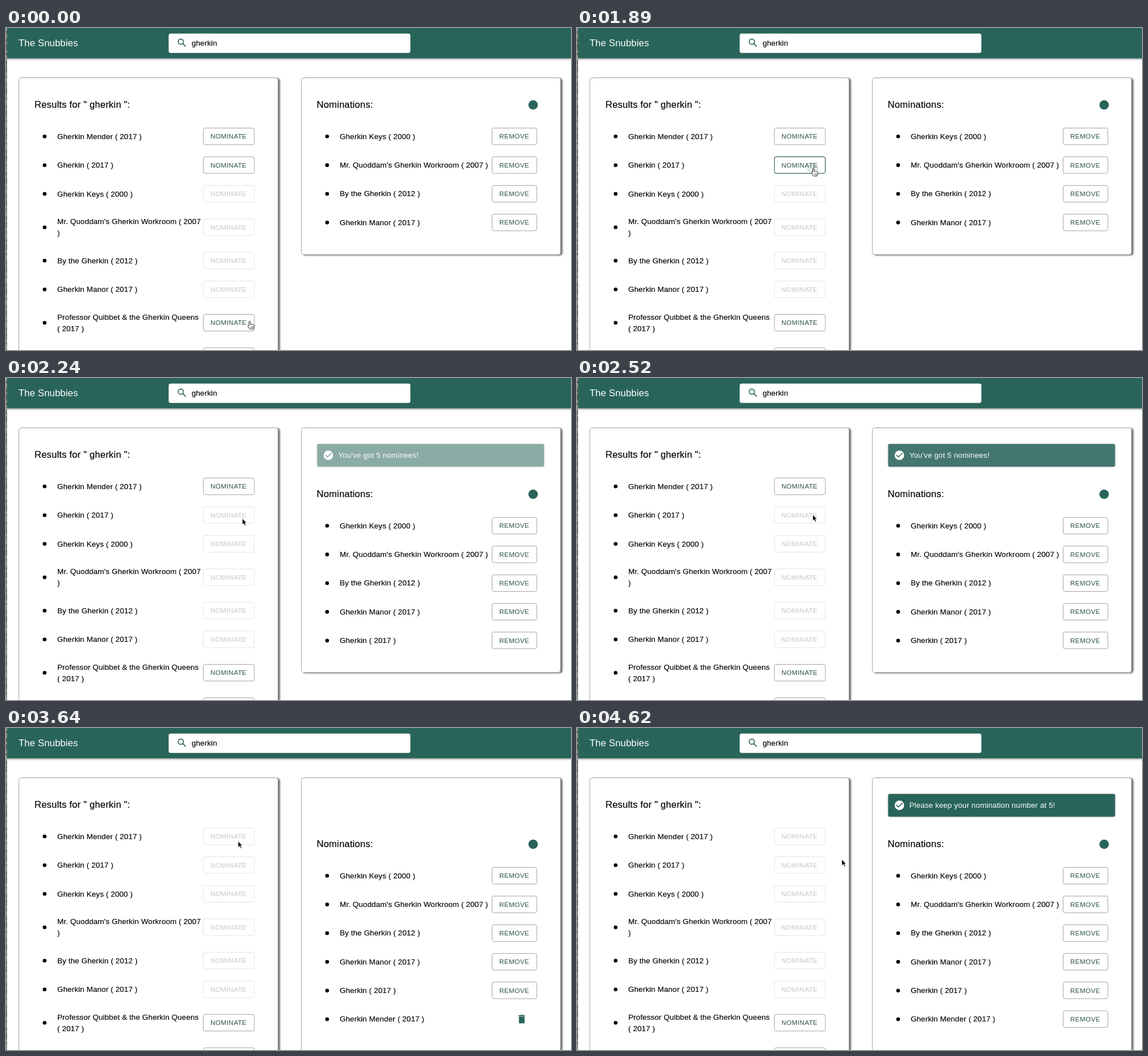
Write an HTML page that moves like this. It is 992 px wide and 565 px high and loops after 4.69 s.

```html
<!DOCTYPE html>
<html lang="en">
<head>
<meta charset="utf-8">
<title>The Snubbies</title>
<style>
  html, body { margin: 0; width: 100%; height: 100%; overflow: hidden; background: #fff; }
  svg { display: block; width: 992px; height: 565px; }
  text { font: 13.37px "Liberation Sans", Arial, Helvetica, sans-serif; letter-spacing: .0094em; fill: #000; stroke: #000; stroke-width: .15px; white-space: pre; }
  .title { font-size: 16.7px; letter-spacing: .0075em; }
  .light { fill: #fff; stroke: none; }
  .label { font-size: 11.7px; letter-spacing: .0286em; fill: #2a5349; stroke: none; }
  .green { fill: #29645a; }
  .panel { fill: #fff; stroke: #a8a8a8; filter: drop-shadow(3.5px 1.7px 1.6px rgba(0, 0, 0, .58)); }
  .box { fill: #fff; stroke: #a3a3a3; }
  .off .box { stroke: #e4e4e4; }
  .off .label { fill: #c6c6c6; }
  .box.hot { fill: none; stroke: #29645a; }

  .t { animation: 4690ms step-end infinite; }

  @keyframes before5 { 0% { opacity: 1 } 41.7%, 100% { opacity: 0 } }
  @keyframes after5 { 0% { opacity: 0 } 41.7%, 100% { opacity: 1 } }
  @keyframes before6 { 0% { opacity: 1 } 77.5%, 100% { opacity: 0 } }
  @keyframes after6 { 0% { opacity: 0 } 77.5%, 100% { opacity: 1 } }
  @keyframes trash5 { 0% { opacity: 0 } 41.7% { opacity: 1 } 44.7%, 100% { opacity: 0 } }
  @keyframes trash6 { 0% { opacity: 0 } 77.5% { opacity: 1 } 80.5%, 100% { opacity: 0 } }
  @keyframes remove5 { 0% { opacity: 0 } 44.7%, 100% { opacity: 1 } }
  @keyframes remove6 { 0% { opacity: 0 } 80.5%, 100% { opacity: 1 } }
  @keyframes press5 { 0% { opacity: 0 } 40.2% { opacity: .13 } 41.7%, 100% { opacity: 0 } }
  @keyframes press6 { 0% { opacity: 0 } 76.1% { opacity: .13 } 77.5%, 100% { opacity: 0 } }
  @keyframes grow { 0% { height: 310px } 41.7% { height: 429px } 77.5%, 100% { height: 479.5px } }
  @keyframes shift { 0% { transform: none } 41.7%, 100% { transform: translateY(69px) } }
  @keyframes hover5 {
    0% { opacity: 0 }
    11.3% { opacity: 0; animation-timing-function: ease-in-out }
    16.4%, 100% { opacity: 1 }
  }
  @keyframes hover6 {
    0% { opacity: 0 }
    56.5% { opacity: 0; animation-timing-function: ease-in-out }
    61%, 100% { opacity: 1 }
  }
  @keyframes notice {
    0% { opacity: 0 }
    41.05% { opacity: 0; animation-timing-function: ease }
    62.4% { opacity: 1 }
    77.5% { opacity: 0 }
    78.36% { opacity: 0; animation-timing-function: ease }
    99.68%, 100% { opacity: 1 }
  }
  @keyframes move {
    0% { transform: translate(428px, 515px) }
    1.49% { transform: translate(428px, 515px); animation-timing-function: ease-in-out }
    11.94% { transform: translate(415px, 246.5px) }
    52.2% { transform: translate(415px, 246.5px); animation-timing-function: ease-in-out }
    58.2% { transform: translate(407.5px, 198.5px) }
    88.1% { transform: translate(407.5px, 198.5px); animation-timing-function: ease-in-out }
    97%, 100% { transform: translate(465px, 230.5px) }
  }
  @keyframes hand {
    0% { opacity: 1 } 2.9% { opacity: 0 } 11.2% { opacity: 1 }
    41.7% { opacity: 0 } 56.5% { opacity: 1 } 77.5%, 100% { opacity: 0 }
  }
  @keyframes arrow {
    0% { opacity: 0 } 2.9% { opacity: 1 } 11.2% { opacity: 0 }
    41.7% { opacity: 1 } 56.5% { opacity: 0 } 77.5%, 100% { opacity: 1 }
  }
</style>
</head>
<body>
<script>
const films = {
  mender: 'Gherkin Mender ( 2017 )',
  plain: 'Gherkin ( 2017 )',
  keys: 'Gherkin Keys ( 2000 )',
  shop: "Mr. Quoddam's Gherkin Workroom ( 2007 )",
  by: 'By the Gherkin ( 2012 )',
  manor: 'Gherkin Manor ( 2017 )',
};

const text = (x, y, words, cls = '') => `<text x="${x}" y="${y}" class="${cls}">${words}</text>`;
const timed = (name, body) => `<g class="t" style="animation-name:${name}">${body}</g>`;
const icon = (x, y, body) => `<g transform="translate(${x} ${y}) scale(.836)">${body}</g>`;
const outline = (x, y, w, cls = '') =>
  `<rect x="${x + .5}" y="${y - 14.6}" width="${w - 1}" height="29.2" rx="3.3" class="box ${cls}"/>`;
const button = (x, y, w, label, extra = '') =>
  outline(x, y, w) + extra + text(x + 13, y + 4.2, label, 'label');
const nominate = (y, extra) => button(346, y, 90.5, 'NOMINATE', extra);
const disabled = y => `<g class="off">${nominate(y)}</g>`;

function item(x, y, ...lines) {
  const top = y + 4.7 - (lines.length - 1) * 10;
  return `<circle cx="${x + 67.8}" cy="${y + .3}" r="3.3"/>` +
    lines.map((line, i) => text(x + 90, top + i * 20, line)).join('');
}

// A button that is hovered, pressed, then disabled when its film is nominated.
function picked(y, n, px, py) {
  const hot = `<circle cx="${px}" cy="${py}" r="10" class="green t" style="animation-name:press${n}"/>` +
    timed('hover' + n, outline(346, y, 90.5, 'hot'));
  return timed('before' + n, nominate(y, hot)) + timed('after' + n, disabled(y));
}

const header = `
  <rect x="1.6" width="991" height="53.2" class="green" style="filter:drop-shadow(0 2px 1.6px rgba(0,0,0,.35))"/>
  ${text(22, 32, 'The Snubbies', 'title light')}
  <rect x="285.6" y="9.8" width="424.4" height="34" rx="3.5" fill="#fff"/>
  ${icon(299, 16, '<g fill="none" stroke="#29645a" stroke-width="2"><circle cx="9.5" cy="9.5" r="5.5"/><path d="M13.6 13.6L19.8 19.8"/></g>')}
  ${text(326, 31, 'gherkin')}`;

const results = `
  <rect x="22.5" y="87.5" width="455" height="520" rx="4" class="panel"/>
  ${text(50, 140, 'Results for " gherkin ":', 'title')}
  ${item(0, 190, films.mender)}${picked(190.2, 6, 407.5, 199)}
  ${item(0, 240.4, films.plain)}${picked(240.5, 5, 414, 246)}
  ${item(0, 290.8, films.keys)}${disabled(290.9)}
  ${item(0, 349.4, films.shop.slice(0, -2), ')')}${disabled(349.5)}
  ${item(0, 408, films.by)}${disabled(408.1)}
  ${item(0, 458.4, films.manor)}${disabled(458.5)}
  ${item(0, 517, 'Professor Quibbet &amp; the Gherkin Queens', '( 2017 )')}${nominate(517.1)}
  ${nominate(575.7)}`;

const remove = y => button(853, y, 79.5, 'REMOVE');
const trash = y => icon(895.5, y - 10,
  '<path class="green" d="M6 19c0 1.1.9 2 2 2h8c1.1 0 2-.9 2-2V7H6zM19 4h-3.5l-1-1h-5l-1 1H5v2h14z"/>');
const added = (y, n, film) => timed('after' + n, item(496, y, film)) +
  timed('trash' + n, trash(y)) + timed('remove' + n, remove(y));
const firstFour = [films.keys, films.shop, films.by, films.manor];

const nominations = `
  <rect x="518.5" y="87.5" width="455" height="310" rx="4" class="panel t" style="animation-name:grow"/>
  ${timed('shift', `
    ${text(545.5, 140, 'Nominations:', 'title')}
    <circle cx="925.5" cy="135" r="8.3" class="green"/>
    ${firstFour.map((film, i) => item(496, 190 + i * 50.35, film) + remove(190.2 + i * 50.35)).join('')}
    ${added(391.4, 5, films.plain)}
    ${added(441.7, 6, films.mender)}`)}
  ${timed('notice', `
    <rect x="546" y="115.5" width="399" height="40.5" rx="3" class="green" stroke="#b5b5b5"/>
    ${icon(556, 125.6, '<circle cx="12" cy="12" r="10" fill="#fff"/><path class="green" d="M10 17l-5-5 1.4-1.4 3.6 3.6 7.6-7.6L19 8z"/>')}
    ${timed('before6', text(583.5, 140.3, "You've got 5 nominees!", 'light'))}
    ${timed('after6', text(583.5, 140.3, 'Please keep your nomination number at 5!', 'light'))}`)}`;

const cursor = timed('move',
  timed('hand', `<path fill="#fff" stroke="#222" d="M-1.3 7.5V.9a1.2 1.2 0 0 1 2.4 0V5.2l1-.2a1 1 0 0 1 1.6.4
    a1.1 1.1 0 0 1 2 .4a1.1 1.1 0 0 1 1.8 .9V9.5l-1.2 3.8H.2L-3.4 8.6a1.1 1.1 0 0 1 1.6-1.3z"/>
    <path stroke="#222" stroke-width=".7" d="M1.8 8.5v3M3.6 8.5v3M5.4 8.5v3"/>`) +
  timed('arrow', '<path stroke="#fff" stroke-width=".7" d="M0 0V11l2.6-2.4 1.9 4.2 1.8-.8-1.9-4.1H7.4z"/>'));

// Sliver of the mottled desktop behind the window.
const edge = `
  <path d="M.8 0V565" stroke="#444" stroke-width="1.6"/>
  <path d="M.8 0V565" stroke="#9a9a94" stroke-width="1.6" stroke-dasharray="5 4 9 7 3 11"/>`;

document.body.innerHTML =
  `<svg viewBox="0 0 992 565">${header}${results}${nominations}${edge}${cursor}</svg>`;
</script>
</body>
</html>
```
